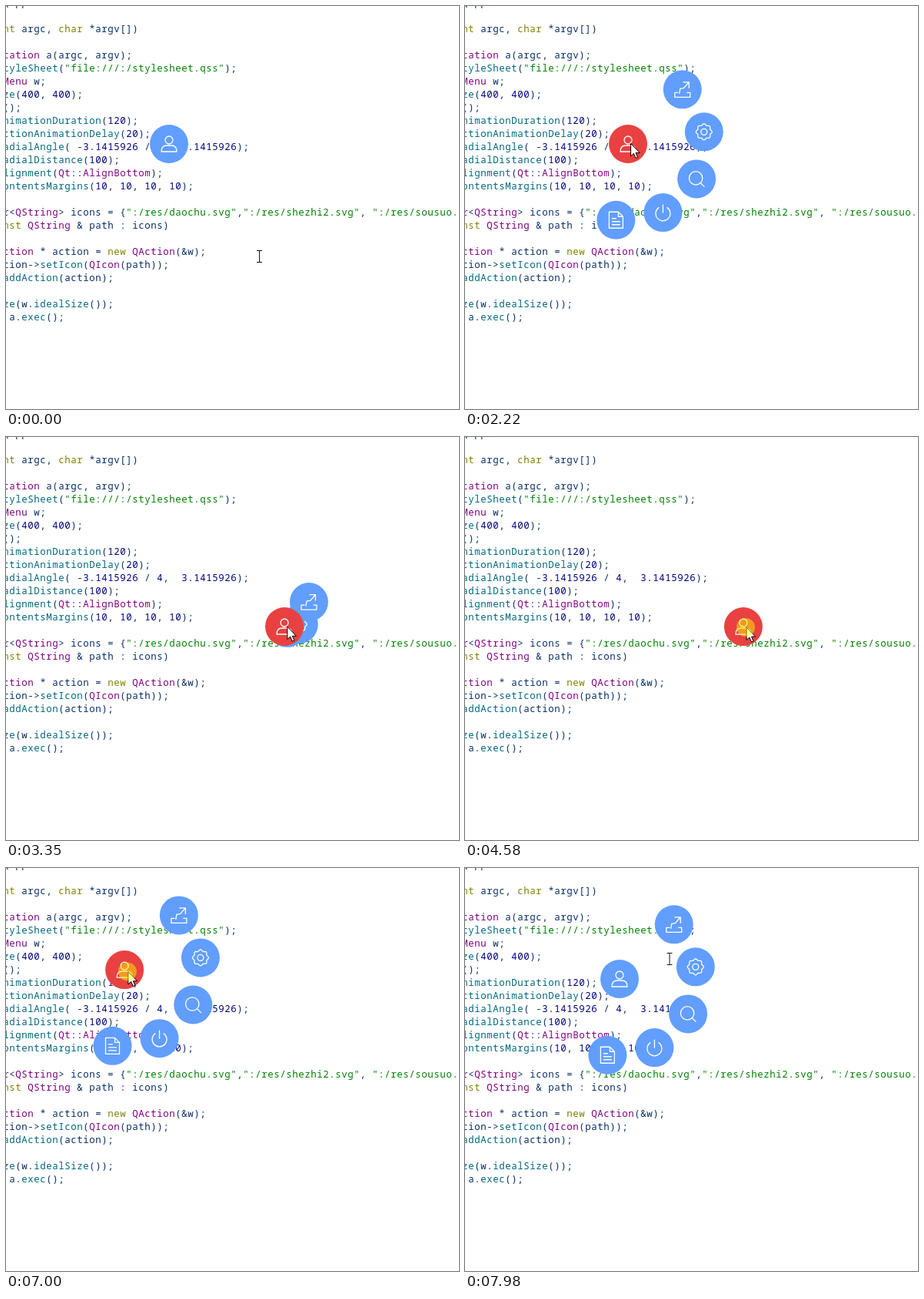
Animation, 589 px wide and 523 px high, one loop 8 s. Source, as an HTML page:

```html
<!DOCTYPE html>
<html lang="en">
<head>
<meta charset="utf-8">
<title>Radial menu</title>
<style>
  html, body { margin: 0; width: 100%; height: 100%; overflow: hidden; background: #fff; }
  svg { display: block; width: 100%; height: 100%; }
  text { font: 12.4px "Noto Sans Mono", "DejaVu Sans Mono", monospace; letter-spacing: .56px; white-space: pre; }
  .icon { fill: none; stroke: #fff; stroke-width: 1.3; stroke-linejoin: round; stroke-linecap: round; }
</style>
</head>
<body>
<svg id="stage" viewBox="0 0 589 523">
  <g id="code"></g>
  <g id="items"></g>
  <g id="main"></g>
  <path id="arrow" d="M0 0V16.5L3.8 13L6.4 19L9 18L6.5 12.2H11.6Z" fill="#fff" stroke="#000"/>
  <path id="beam" d="M-3.5 -7.5H3.5M0 -7.5V7.5M-3.5 7.5H3.5" fill="none" stroke="#112"/>
  <circle id="press" r="12" fill="#ff0" fill-opacity=".47"/>
</svg>
<script>
const LOOP = 8000, REFRESH = 67, BLUE = '#619eff', RED = '#e94141';
const $ = id => document.getElementById(id);

function add(parent, tag, attrs) {
  const el = document.createElementNS('http://www.w3.org/2000/svg', tag);
  for (const k in attrs) el.setAttribute(k, attrs[k]);
  return parent.appendChild(el);
}

// Editor text: every line starts half a cell left of the edge
const code = `QApplication>

nt argc, char *argv[])

cation a(argc, argv);
tyleSheet("file:///:/stylesheet.qss");
Menu w;
ze(400, 400);
();
nimationDuration(120);
ctionAnimationDelay(20);
adialAngle( -3.1415926 / 4,  3.1415926);
adialDistance(100);
lignment(Qt::AlignBottom);
ontentsMargins(10, 10, 10, 10);

r<QString> icons = {":/res/daochu.svg",":/res/shezhi2.svg", ":/res/sousuo.s
nst QString & path : icons)

ction * action = new QAction(&w);
tion->setIcon(QIcon(path));
addAction(action);

ze(w.idealSize());
 a.exec();`;

function colour(word, next) {
  if (word[0] === '"') return '#008000';
  if (/^\d/.test(word)) return '#000080';
  if (/^(nt|char|new|nst)$/.test(word)) return '#808000';
  if (/^(cation|Menu|r|ction|Qt|QString|QAction|QIcon|AlignBottom)$/.test(word)) return '#800080';
  if (/^\w\w/.test(word) && next === '(') return '#00677c';
  return '#092e64';
}

code.split('\n').forEach((line, row) => {
  for (const { 0: word, index } of line.matchAll(/"[^"]*"?|\d[\d.]*|\w+|[^\s\w"]+/g)) {
    const fill = colour(word, line[index + word.length]);
    add($('code'), 'text', { x: index * 8 - 3.7, y: row * 17, fill }).textContent = word;
  }
});

// Icons
const ring = (x, y, r) => `M${x - r} ${y}a${r} ${r} 0 1 0 ${2 * r} 0a${r} ${r} 0 1 0 ${-2 * r} 0`;
const gear = Array.from({ length: 96 }, (_, i) => {
  const a = i / 48 * Math.PI, r = 9.6 + .9 * Math.cos(8 * a);
  return (r * Math.cos(a)).toFixed(2) + ' ' + (r * Math.sin(a)).toFixed(2);
}).join('L');
const icons = {
  user: ring(0, -5, 5) + 'M-10 10C-10 4 -7 2 -3 2H3C7 2 10 4 10 10Z',
  share: 'M-6 4H-10V10H10V4H6M-4 5L-3 -1L2 -2L8 -9M1 -9.5H8.5V-2',
  gear: 'M' + gear + 'Z' + ring(0, 0, 4),
  search: ring(-1, -1, 8.7) + 'M5.4 5.4L10 10',
  power: 'M-5.5 -6.5A9.5 9.5 0 1 0 5.5 -6.5M0 -10V0',
  doc: 'M-9 -10.5H3L9 -4.5V10.5H-9ZM3 -10.5V-4.5H9M-5 -2H0M-5 2H5M-5 6H5'
};

function button(parent, name) {
  add(parent, 'circle', { r: 25, fill: BLUE });
  add(parent, 'path', { d: icons[name], class: 'icon' });
  return parent;
}

const main = button($('main'), 'user');
const names = ['share', 'gear', 'search', 'power', 'doc'];
const items = names.map(name => {
  const g = add($('items'), 'g', {});
  $('items').prepend(g);
  return button(g, name);
});

const clamp = (v, a, b) => Math.min(b, Math.max(a, v));
const mix = (a, b, u) => a + (b - a) * u;
const inOut = u => u < .5 ? 2 * u * u : 1 - 2 * (1 - u) ** 2;
function glide(t, from, to) {
  const u = clamp((t - from) / (to - from), 0, 1);
  return u * u * (3 - 2 * u);
}

// Each click toggles the menu; each drag is start, end and the new centre
const clicks = [925, 1465, 2000, 3207, 3665, 4150, 5207, 5616, 6665];
const drags = [
  [2340, 3000, 362, 246], [4550, 5030, 115, 398], [6020, 6440, 154, 132],
  [6960, 7440, 310, 245], [7600, 7890, 201, 144]
];

function centre(t) {
  return drags.reduce(([x, y], [from, to, nx, ny]) => {
    const u = glide(t, from, to);
    return [mix(x, nx, u), mix(y, ny, u)];
  }, [212, 179]);
}

// Pointer relative to the button: comes in with a pause, drifts a little, leaves
function pointer(t) {
  const near = glide(t, 10, 270), over = glide(t, 350, 590), away = glide(t, 7890, 7970);
  return [
    mix(mix(117.5, -13, near), 3 + t / 4000, over) + 60 * away,
    mix(mix(146, 24, near), -2 + t / 1600, over) - 29 * away
  ];
}

// Menu clock: 0 closed, 200 open; closing runs it backwards
function menuClock(t) {
  const done = clicks.filter(c => c <= t);
  if (!done.length) return 0;
  const run = Math.min(t - done.at(-1), 200);
  return done.length % 2 ? run : 200 - run;
}

const pressed = t =>
  clicks.some(c => t >= c - 125 && t < c) ||
  drags.some(([from, to]) => t >= from && t < to + 150);

const place = (el, x, y) => el.setAttribute('transform', `translate(${x.toFixed(2)} ${y.toFixed(2)})`);
const show = (el, on) => el.setAttribute('visibility', on ? 'visible' : 'hidden');

function draw(time) {
  const t = Math.floor(time / REFRESH) * REFRESH;
  const [x, y] = centre(t), [dx, dy] = pointer(t);
  const hover = Math.hypot(dx, dy) < 25;
  const clock = menuClock(t);

  place(main, x, y);
  main.firstChild.setAttribute('fill', hover ? RED : BLUE);

  items.forEach((item, i) => {
    const r = 100 * inOut(clamp((clock - 20 * i) / 120, 0, 1));
    const a = (i / 5 - 1 / 4) * Math.PI;
    place(item, x + r * Math.cos(a), y + r * Math.sin(a));
    show(item, r > 0);
  });

  place($('arrow'), x + dx, y + dy);
  place($('beam'), x + dx, y + dy);
  place($('press'), x + dx - 1, y + dy);
  show($('arrow'), hover);
  show($('beam'), !hover);
  show($('press'), hover && pressed(t));
}

function tick() {
  draw(performance.now() % LOOP);
  requestAnimationFrame(tick);
}
tick();
</script>
</body>
</html>
```
